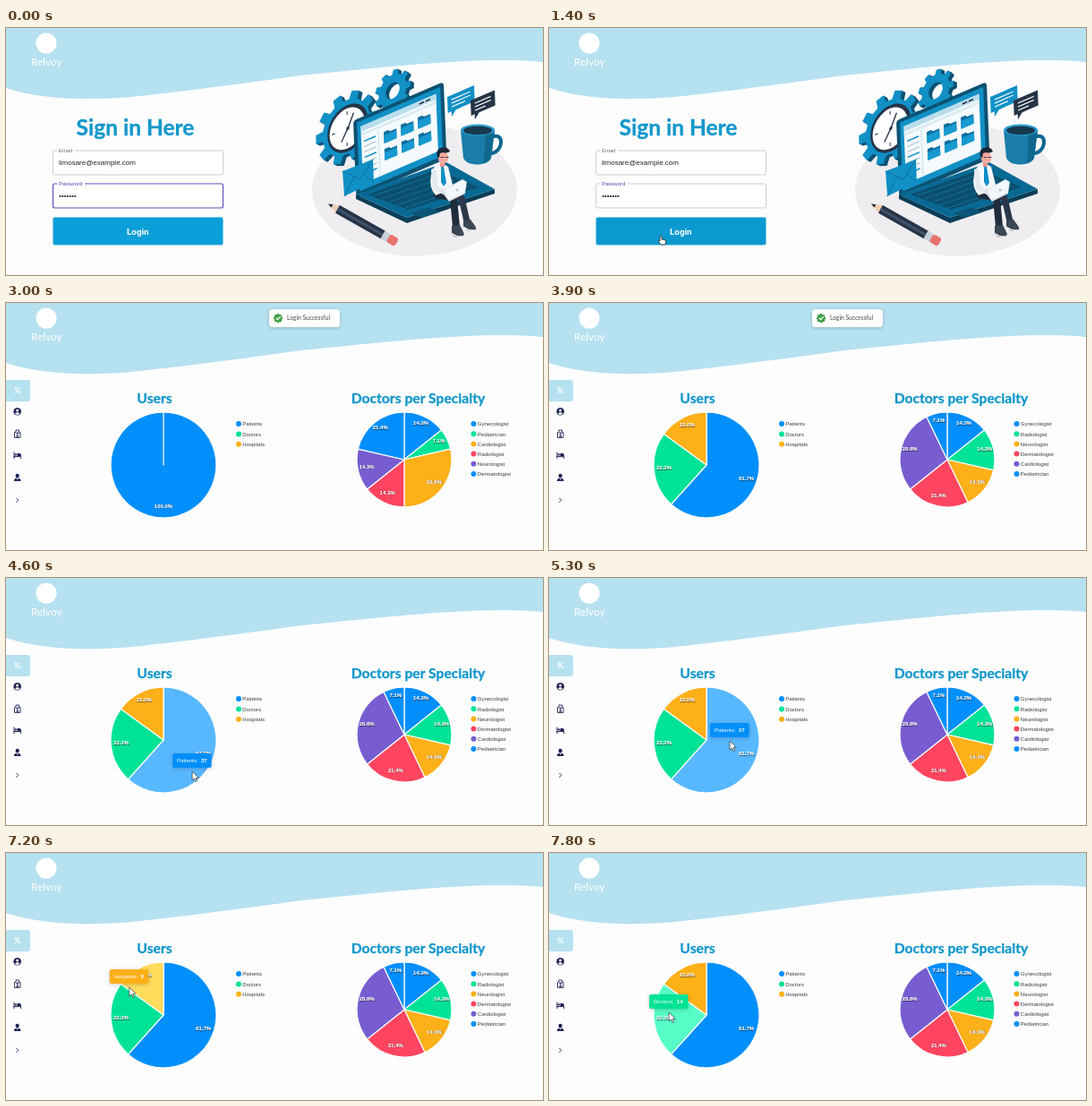
These frames come from a looping animation (600 px wide and 276 px high, 8 s). An HTML page:

```html
<!DOCTYPE html>
<html lang="en">
<head>
<meta charset="utf-8">
<title>Clinic dashboard login</title>
<style>
html, body { margin: 0; width: 100%; height: 100%; overflow: hidden; background: #fdfdfe; }
svg { display: block; width: 100vw; height: 100vh; }
text { font: 6px "Liberation Sans", Arial, sans-serif; fill: #373d3f; white-space: pre; }
.head { font: 700 15.7px Lato, sans-serif; fill: #1197cb; stroke: #1197cb; stroke-width: .3; text-anchor: middle; }
.title { font-size: 24.5px; }
.brand { font: 11.8px Lato, sans-serif; fill: #fff; }
.toast { font: 6.7px Lato, sans-serif; fill: #484848; }
.button { font: 600 9.8px Roboto, sans-serif; fill: #fff; text-anchor: middle; }
.percent { font: 700 9.5px Lato, sans-serif; fill: #fff; text-anchor: middle; }
.input { font-size: 8px; fill: #222; }
.label { fill: #666; }
.tip { fill: #fff; }
.share { font-weight: 700; fill: #fff; stroke: #fff; stroke-width: .15; text-anchor: middle; }
.under { fill: #0007; stroke: #0003; stroke-width: .6; }
.shadow { filter: drop-shadow(0 1px 2px #0003); }
</style>
</head>
<body>
<svg id="stage" viewBox="0 0 600 276" preserveAspectRatio="none" xmlns="http://www.w3.org/2000/svg"></svg>
<script>
const LOOP = 8000;
const DASH_AT = 2000, SWEEP = [2100, 2850], MORPH = [3100, 3550], BLUR_AT = 1250;
const SKY = '#b6e1f0', BLUE = '#1190c6', DEEP = '#0d5272', INK = '#263447';
const COLORS = ['#008ffb', '#00e396', '#feb019', '#ff4560', '#775dd0', '#008ffb'];
const HOVER = ['#58b8ff', '#57fdc6', '#ffdc5c'];

const users = {
  cx: 176, cy: 181, r: 59, legendX: 260, step: 11.4,
  names: [['Patients', 'Doctors', 'Hospitals']],
  counts: [[37, 0, 0], [37, 14, 9]]
};
const specialties = {
  cx: 445, cy: 175, r: 53, legendX: 522.5, step: 11.2,
  names: [
    ['Gynecologist', 'Pediatrician', 'Cardiologist', 'Radiologist', 'Neurologist', 'Dermatologist'],
    ['Gynecologist', 'Radiologist', 'Neurologist', 'Dermatologist', 'Cardiologist', 'Pediatrician']
  ],
  counts: [[2, 1, 4, 2, 2, 3], [2, 2, 2, 3, 4, 1]]
};

const clamp = v => Math.min(1, Math.max(0, v));
const progress = (t, [from, to]) => clamp((t - from) / (to - from));
const ease = p => p * p * (3 - 2 * p);
const mix = (a, b, p) => a + (b - a) * p;
const fix = v => +v.toFixed(2);

const poly = (points, fill) => `<polygon points="${points}" fill="${fill}"/>`;
const rect = (x, y, w, h, fill, extra = '') =>
  `<rect x="${x}" y="${y}" width="${w}" height="${h}" fill="${fill}" ${extra}/>`;
const path = (d, fill, extra = '') => `<path d="${d}" fill="${fill}" ${extra}/>`;
const line = (d, stroke, width) =>
  `<path d="${d}" fill="none" stroke="${stroke}" stroke-width="${width}" stroke-linecap="round" stroke-linejoin="round"/>`;
const oval = (x, y, rx, ry, fill) => `<ellipse cx="${x}" cy="${y}" rx="${rx}" ry="${ry}" fill="${fill}"/>`;
const text = (x, y, cls, s) => `<text x="${fix(x)}" y="${fix(y)}" class="${cls}">${s}</text>`;
const group = (attrs, ...parts) => `<g ${attrs}>${parts.join('')}</g>`;

// Illustration
function gearPath(r, teeth, hole) {
  const pts = [];
  for (let i = 0; i < teeth; i++) {
    [[-.3, .78], [-.2, 1], [.2, 1], [.3, .78]].forEach(([o, k]) => {
      const a = (i + o) / teeth * 2 * Math.PI;
      pts.push(fix(r * k * Math.cos(a)) + ' ' + fix(r * k * Math.sin(a)));
    });
  }
  return `M${pts.join('L')}ZM${hole} 0A${hole} ${hole} 0 1 0 ${-hole} 0A${hole} ${hole} 0 1 0 ${hole} 0Z`;
}

function gear(x, y, r, teeth, hole) {
  const d = gearPath(r, teeth, hole);
  const layer = (dx, dy, fill) => group(`transform="matrix(.87 -.36 0 1 ${x + dx} ${y + dy})"`,
    path(d, fill, 'fill-rule="evenodd"'));
  return [4, 3, 2, 1].map(i => layer(i, i / 2, DEEP)).join('') + layer(0, 0, BLUE);
}

function clock() {
  return group('transform="matrix(.87 -.36 0 1 382 112)"',
    oval(0, 0, 26, 26, INK), oval(-1, 0, 22.5, 22.5, '#fff'),
    line('M-1-19v3M-1 16v3M-20 0h3M15 0h3', INK, 1.2),
    line('M7-14L0 0L-8 12', INK, 1.8), oval(0, 0, 2, 2, INK));
}

function folder(x, y) {
  return path(`M${x} ${y}h5l2 2h7v10h-14z`, '#0b6f9f') + rect(x, y + 4, 14, 9, '#1899d0');
}

function laptop() {
  let folders = '', rows = '', keys = '';
  for (let i = 0; i < 6; i++) folders += folder(32 + i % 3 * 19, 26 + (i / 3 | 0) * 19);
  for (let i = 0; i < 7; i++) rows += rect(10, 26 + i * 6, 13, 1.6, i % 3 ? '#b9cfda' : BLUE);
  for (let i = 0; i < 5; i++) keys += line(`M${412 + i * 8} ${187 + i * 3.7}l72-24.6`, '#1579a0', .8);
  const screen = group('transform="matrix(1 -.43 .04 1 389 104)"',
    rect(-1, -1, 101, 86, DEEP, 'rx="4"'),
    rect(3, 3, 93, 77, BLUE, 'rx="1"'),
    rect(7, 9, 84, 64, '#f5fafc'), rect(7, 9, 84, 6, '#b9ddec'),
    rect(7, 17, 84, 3, '#dcebf2'), rect(25, 21, 2, 52, '#dcebf2'),
    line('M73 12h4m3 0h4', INK, 1.6), rows, folders);
  const base =
    poly('391,186 448,212 546,180 546,185 448,218 391,191', '#0a3d57') +
    poly('391,186 492,150 546,180 448,212', '#086a94') +
    poly('404,186 482,158 528,178 449,203', '#0b4f6e') + keys +
    poly('452,207 472,200 484,206 464,212', '#0a5577');
  const envelope = poly('376,160 410,147 411,172 378,188', BLUE) +
    line('M376 160L396 169L410 147M378 188L389 166M411 172L399 163', '#0b6795', .8);
  return screen + base + envelope;
}

function bubble(x, y, w, h, fill) {
  return group(`transform="matrix(1 -.43 .04 1 ${x} ${y})"`,
    path(`M0 0h${w}v${h}h${-w + 9}l-5 6v-6h-4z`, fill),
    line(`M5 5h${w - 10}M5 9h${w - 10}M5 13h${w - 16}`, '#fff', 1.2));
}

function mug() {
  return line('M545 121c12-3 10 17-2 19', '#0c6690', 4) +
    path('M508 114L511 145C514 155 539 155 542 145L546 114Z', '#197ca9') +
    path('M536 117L534 151C538 150 541 148 542 145L546 114Z', '#0f688f') +
    oval(527, 114, 19, 6.5, '#2a9bcb') + oval(527, 114.5, 16, 4.8, '#17394e');
}

function man() {
  return line('M482 186L500 190L503 222', '#202b3b', 8) +
    line('M488 183L509 190L515 216', '#2b3749', 7) +
    path('M498 221l9-1 4 8c2 4-1 6-5 6-5 0-8-3-8-6z', '#3c4654') +
    path('M511 215l8-1 5 7c3 4 0 6-4 6-5 0-8-3-9-6z', '#3c4654') +
    line('M499 230q4 4 11 3M512 223q5 4 12 3', '#fff', 1.4) +
    path('M479 154Q488 150 494 155L500 179L480 187Q472 178 475 164Z', '#f7f9fb') +
    path('M486 154l3 1 3 18-3 4-3-5z', BLUE) +
    line('M478 160L480 179L492 184', '#e5ebf0', 6) + oval(493, 184, 3, 2.3, '#f4a79b') +
    rect(485, 149, 5, 6, '#ec978c') + oval(488.5, 145, 5.6, 6.8, '#f6a99d') +
    path('M482 144C478 132 494 130 496 138C491 141 487 138 485 140L484 145Z', '#1c2735') +
    line('M486 144.5h3m2 0h3', '#1c2735', .8) +
    path('M486 182L510 169L515 172L513 185L495 194Z', '#dce4e9') +
    path('M490 181L510 170L514 173L512 184L494 192Z', '#f4f7f9') + oval(504, 181, 1.5, 1.5, '#b5c4cd');
}

function pencil() {
  return group('transform="translate(360 196.5) rotate(29.5)"',
    path('M0 0L13-5V5Z', '#f1cdb0'), path('M0 0L5-2V2Z', '#202b3b'),
    rect(12, -5, 59, 10, INK), rect(12, -1.5, 59, 3, '#3f5268'),
    rect(70, -5, 7, 10, '#c7d0d7'), rect(77, -5, 11, 10, '#e8736d', 'rx="3"'));
}

function illustration() {
  return oval(456.5, 181, 114.5, 74, '#efedf0') +
    gear(432, 70, 23, 9, 9) + gear(380, 111, 39, 10, 24) + clock() + laptop() +
    bubble(493, 77, 30, 18, BLUE) + bubble(519, 81, 27, 17, INK) +
    mug() + man() + pencil();
}

// Pages
const banner = path('M0 0H600V38C530 31 420 44 330 53C300 57 230 67 150 76C90 82 40 80 0 67Z', SKY) +
  oval(45, 17, 11.5, 11.5, '#fff') + text(28, 41.5, 'brand', 'Relvoy');

function loginPage() {
  let dots = '';
  for (let i = 0; i < 7; i++) dots += oval(60.5 + i * 2.8, 188, 1.1, 1.1, '#222');
  const field = (y, id) => rect(52.5, y, 190, 27, '#fff', `id="${id}" rx="2" stroke="#c9c9cc" stroke-width=".9"`);
  return banner + text(144.5, 120, 'head title', 'Sign in Here') +
    field(137, 'email') + rect(57, 135, 20, 5, '#fff') + text(59, 139, 'label', 'Email') +
    text(59, 153, 'input', 'limosare@example.com') +
    field(174, 'password') + rect(57, 172, 31, 5, '#fff') +
    '<text id="passLabel" x="59" y="176" class="label">Password</text>' + dots +
    rect(52.5, 211.5, 190, 31, '#0a9fd8', 'id="button" rx="2"') + text(147.3, 231, 'button', 'Login') +
    illustration();
}

function sidebar() {
  const ink = '#1c2052';
  return path('M0 86H24Q27 86 27 89V107Q27 110 24 110H0Z', SKY) + text(12.8, 100.5, 'percent', '%') +
    oval(12.7, 121.3, 4.3, 4.3, ink) + oval(12.7, 120, 1.5, 1.5, '#fff') +
    path('M9.9 123.6Q12.7 121 15.5 123.6Q12.7 126.2 9.9 123.6Z', '#fff') +
    line('M9.5 150V144.5H11V142H14.5V144.5H16V150ZM12 150V148H13.5V150M11.7 145.8h2.2M12.8 144.7v2.2', ink, .9) +
    line('M9 167V173.5M9 171.6H16.7V173.5', ink, 1) + path('M12.5 168H15Q17 168 17 171H12.5Z', ink) +
    oval(10.9, 169.4, 1.1, 1.1, ink) +
    oval(12.7, 193, 2.1, 2.2, ink) + path('M8.9 199Q9 195.5 12.7 195.5Q16.5 195.5 16.6 199Z', ink) +
    line('M12 195.5l.8 2 .8-2', '#fff', .6) +
    line('M11.7 218.2L13.8 220.4L11.7 222.6', ink, .9);
}

function dashPage() {
  return banner + sidebar() +
    text(166, 112, 'head', 'Users') + text(460.5, 112, 'head', 'Doctors per Specialty') +
    '<g id="charts"></g>' +
    group('id="toast"', rect(294, 7, 79, 20, '#fff', 'rx="4" class="shadow"'),
      group('transform="translate(304 17)"',
        rect(-4, -4, 8, 8, '#43a047', 'rx="1"'),
        rect(-4, -4, 8, 8, '#43a047', 'rx="1" transform="rotate(45)"'),
        line('M-2 0L-.5 1.6L2.3-1.5', '#fff', 1.2)),
      text(314, 19.3, 'toast', 'Login Successful'));
}

const arrow = path('M0 0V10L2.4 7.9L4 11.5L5.6 10.8L4 7.3H7.2Z', '#fff', 'stroke="#333" stroke-width=".7"');
const hand = path('M-1 1Q0-1 1 1V4L5 5Q6 5 5.6 8L4.8 10H0L-3 6Q-3 4.5-1 6Z', '#fff', 'stroke="#222" stroke-width=".8"');

document.getElementById('stage').innerHTML =
  group('id="login"', loginPage()) + group('id="dash"', dashPage()) +
  '<g id="tooltip"></g>' +
  group('id="arrow"', arrow) + group('id="hand"', hand);
const el = id => document.getElementById(id);
const show = (id, on) => el(id).style.display = on ? '' : 'none';

// Charts
function edges(counts) {
  const total = counts.reduce((a, b) => a + b);
  let sum = 0;
  return [0, ...counts.map(c => (sum += c) / total)];
}

function slice({ cx, cy, r }, from, to, fill) {
  if (to - from < .0005) return '';
  const at = f => {
    const a = Math.min(f, from + .9999) * 2 * Math.PI;
    return `${(cx + r * Math.sin(a)).toFixed(3)} ${(cy - r * Math.cos(a)).toFixed(3)}`;
  };
  return path(`M${cx} ${cy}L${at(from)}A${r} ${r} 0 ${to - from > .5 ? 1 : 0} 1 ${at(to)}Z`, fill,
    'stroke="#fff" stroke-width="1.2" stroke-linejoin="round"');
}

function share({ cx, cy, r }, from, to) {
  const a = (from + to) * Math.PI;
  const x = cx + r * .81 * Math.sin(a), y = cy - r * .81 * Math.cos(a);
  const label = ((to - from) * 100).toFixed(1) + '%';
  return text(x + .5, y + .5, 'share under', label) + text(x, y, 'share', label);
}

function chart(c, t, hovered) {
  const late = t >= MORPH[0];
  const before = edges(c.counts[0]), after = edges(c.counts[1]);
  const p = ease(progress(t, MORPH)), sweep = ease(progress(t, SWEEP));
  const cut = before.map((b, i) => mix(b, after[i], p));
  const labels = late ? p === 1 : sweep === 1;
  const names = c.names[late ? c.names.length - 1 : 0];
  let out = '', shares = '';
  names.forEach((name, i) => {
    const from = cut[i], to = Math.min(cut[i + 1], sweep);
    out += slice(c, from, to, i === hovered ? HOVER[i] : COLORS[i]);
    const y = 135 + i * c.step;
    out += oval(c.legendX, y, 3, 3, COLORS[i]) + text(c.legendX + 4.3, y + 2.3, '', name);
    if (labels && to > from) shares += share(c, from, to);
  });
  return out + shares;
}

function hoveredSlice({ cx, cy, r, counts }, [x, y]) {
  if (Math.hypot(x - cx, y - cy) > r) return -1;
  const f = (Math.atan2(x - cx, cy - y) / (2 * Math.PI) + 1) % 1;
  return edges(counts[1]).findIndex(e => e > f) - 1;
}

function tooltip([x, y], i) {
  if (i < 0) return '';
  return rect(fix(x - 22), fix(y - 20), 43.5, 16, COLORS[i], 'rx="2" class="shadow"') +
    text(x - 17, y - 10, 'tip', `${users.names[0][i]}:<tspan dx="3.5" font-weight="700">${users.counts[1][i]}</tspan>`);
}

// Pointer paths as [time, x, y]
const LOGIN_PATH = [[400, 146, 276], [1200, 125, 232]];
const DASH_PATH = [[4200, 214, 280], [4800, 206, 194], [5050, 202, 182], [5600, 202, 182],
  [6280, 138, 148], [7100, 138, 148], [7750, 134, 178]];

function along(keys, t) {
  const next = keys.findIndex(k => k[0] > t);
  if (next === 0) return keys[0].slice(1);
  if (next < 0) return keys[keys.length - 1].slice(1);
  const a = keys[next - 1], b = keys[next], p = ease(progress(t, [a[0], b[0]]));
  return [mix(a[1], b[1], p), mix(a[2], b[2], p)];
}

const place = (id, [x, y]) => el(id).setAttribute('transform', `translate(${fix(x)} ${fix(y)})`);

function render(t) {
  const dash = t >= DASH_AT;
  show('login', !dash);
  show('dash', dash);
  show('hand', !dash && t >= LOGIN_PATH[0][0]);
  show('arrow', t >= DASH_PATH[0][0]);
  el('tooltip').innerHTML = '';
  if (!dash) {
    const focus = t < BLUR_AT;
    const pos = along(LOGIN_PATH, t);
    place('hand', pos);
    el('password').setAttribute('stroke', focus ? '#5a54bf' : '#c9c9cc');
    el('password').setAttribute('stroke-width', focus ? 1.2 : .9);
    el('passLabel').style.fill = t < 1450 ? '#4a46b8' : '#666';
    el('button').setAttribute('fill', pos[1] < 243 ? '#0b99d0' : '#0a9fd8');
    return;
  }
  const pos = along(DASH_PATH, t);
  const hovered = t >= DASH_PATH[0][0] ? hoveredSlice(users, pos) : -1;
  place('arrow', pos);
  el('charts').innerHTML = chart(users, t, hovered) + chart(specialties, t, -1);
  el('tooltip').innerHTML = tooltip(pos, hovered);
  const shown = ease(progress(t, [2200, 2550])) * (1 - ease(progress(t, [4250, 4650])));
  el('toast').setAttribute('transform', `translate(0 ${fix(-36 * (1 - shown))})`);
  el('toast').setAttribute('opacity', fix(clamp(shown * 1.5)));
}

function tick(now) {
  render(now % LOOP);
  requestAnimationFrame(tick);
}
render(0);
requestAnimationFrame(tick);
</script>
</body>
</html>
```
